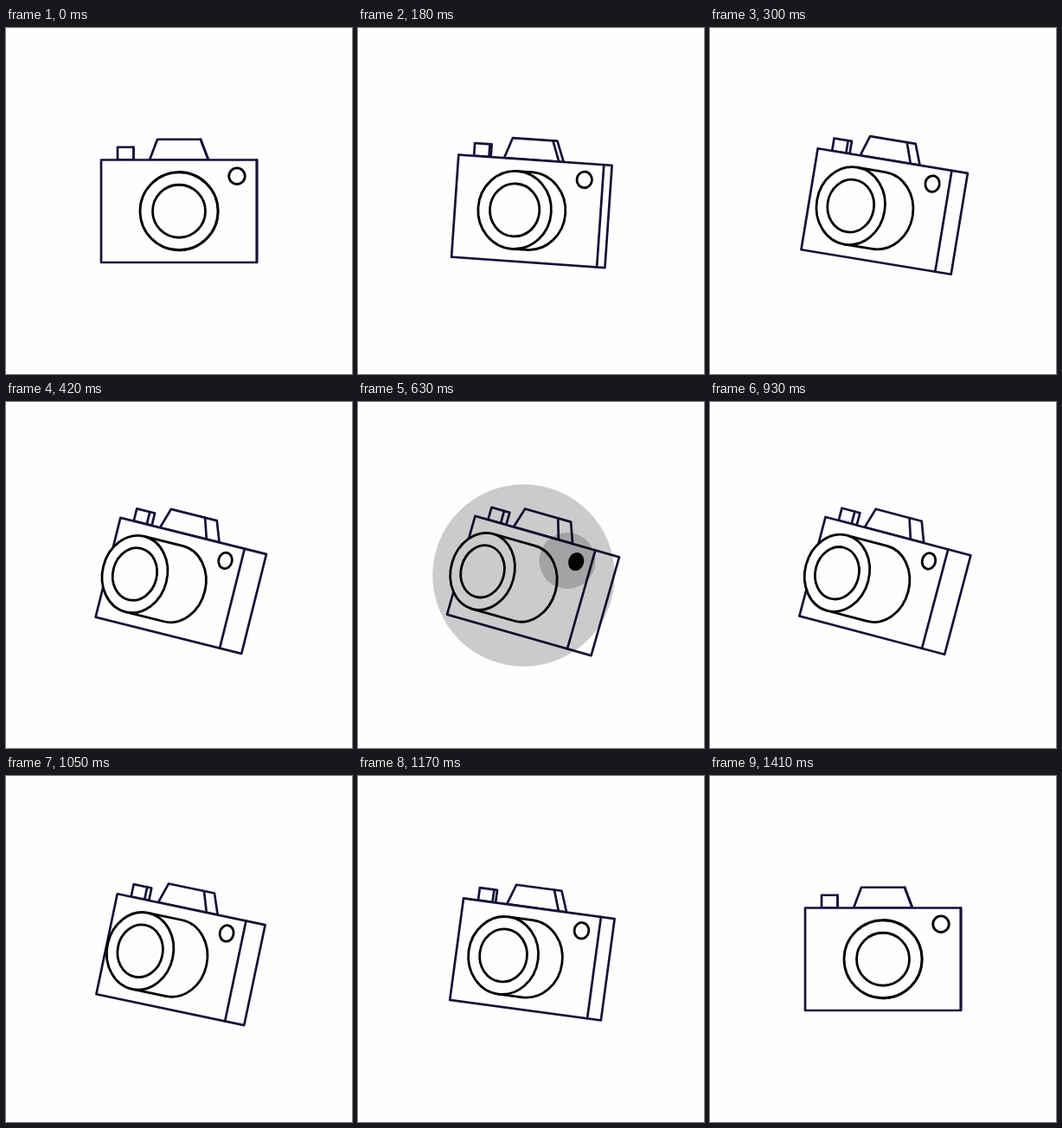
Recreate the animation shown at these times as an HTML page with a canvas. Size 400 by 400 pixels, loop 3470 ms.

```html
<!DOCTYPE html>
<html lang="en">
<head>
<meta charset="utf-8">
<title>Camera</title>
<style>
  html, body { margin: 0; width: 100%; height: 100%; overflow: hidden; background: #fefefe; }
  canvas { display: block; width: 400px; height: 400px; }
</style>
</head>
<body>
<canvas id="stage"></canvas>
<script>
const LOOP = 3470, STEP = 30, RISE = 540;
const TILT = 15.9 * Math.PI / 180;
const NAVY = '#14123a', BLACK = '#000', PAPER = '#fefefe';
const FLASH = [570, 690];
const TOP = -59.25, BOTTOM = 59.25;

// time, turn, slope per ms
const FALL = [
  [540, 1, 0],
  [720, 1, 0],
  [930, 0.93, -0.001],
  [1170, 0.4825, -0.0023],
  [1410, 0, 0]
];

const canvas = document.getElementById('stage');
const ctx = canvas.getContext('2d');
const dpr = window.devicePixelRatio || 1;
canvas.width = canvas.height = Math.round(400 * dpr);

const mix = (a, b, k) => a + (b - a) * k;

function turnAt(t) {
  if (t < RISE) return (1 - Math.cos(Math.PI * t / RISE)) / 2;
  for (let i = 1; i < FALL.length; i++) {
    const [t0, a, ma] = FALL[i - 1], [t1, b, mb] = FALL[i];
    if (t > t1) continue;
    const h = t1 - t0, u = (t - t0) / h, v = 1 - u;
    return a * (1 + 2 * u) * v * v + ma * h * u * v * v
         + b * u * u * (3 - 2 * u) - mb * h * u * u * v;
  }
  return 0;
}

function ink(color, width) {
  ctx.strokeStyle = color;
  ctx.lineWidth = width;
}

function poly(points) {
  ctx.beginPath();
  for (const [x, y] of points) ctx.lineTo(x, y);
  ctx.closePath();
  ctx.fill();
  ctx.stroke();
}

function line(x0, y0, x1, y1) {
  ctx.beginPath();
  ctx.moveTo(x0, y0);
  ctx.lineTo(x1, y1);
  ctx.stroke();
}

function oval(x, y, rx, ry) {
  ctx.beginPath();
  ctx.ellipse(x, y, rx, ry, 0, 0, 2 * Math.PI);
  ctx.fill();
  ctx.stroke();
}

function disc(x, y, r) {
  ctx.beginPath();
  ctx.arc(x, y, r, 0, 2 * Math.PI);
  ctx.fill();
}

function drawCamera(turn, lit) {
  const k = Math.pow(Math.max(turn, 0), 0.81);
  const squash = 1 - 0.185 * k;

  ctx.save();
  ctx.translate(200, 211.75);
  ctx.rotate(TILT * turn);
  ctx.fillStyle = PAPER;
  ink(NAVY, 2.7);

  // shutter button
  const bl = mix(-71, -68.5, k), br = mix(-52.5, -46.7, k), be = mix(-52.5, -53.3, k);
  poly([[bl, TOP], [bl, -74], [br, -74], [br, TOP]]);
  line(be, -74, be, TOP);

  // viewfinder
  const vy = -83;
  poly([[mix(-34, -37.8, k), TOP], [mix(-25, -30.8, k), vy],
        [mix(25, 24.3, k), vy], [mix(34, 33.1, k), TOP]]);
  line(mix(25, 8.8, k), vy, mix(34, 16.3, k), TOP);

  // body and its side
  const left = mix(-90, -84, k), right = mix(90, 89.2, k), edge = mix(90, 60.5, k);
  poly([[left, TOP], [right, TOP], [right, BOTTOM], [left, BOTTOM]]);
  line(edge, TOP, edge, BOTTOM);

  // lens barrel
  ink(BLACK, 2.8);
  const front = -58.2 * k, back = -7.5 * k, r = 45;
  ctx.beginPath();
  ctx.moveTo(front, -r);
  ctx.lineTo(back, -r);
  ctx.ellipse(back, 0, r * squash, r, 0, -Math.PI / 2, Math.PI / 2);
  ctx.lineTo(front, r);
  ctx.fill();
  ctx.stroke();
  oval(front, 0, r * squash, r);
  oval(front, 0, 30.5 * squash, 30.5);

  // lamp
  ctx.fillStyle = lit ? BLACK : PAPER;
  oval(mix(67, 42.7, k), -40.5, 9.3 * squash, 9.3);
  ctx.restore();
}

function draw(time) {
  const t = Math.floor(time % LOOP / STEP + 1e-6) * STEP;
  const lit = t >= FLASH[0] && t < FLASH[1];
  ctx.setTransform(canvas.width / 400, 0, 0, canvas.height / 400, 0, 0);
  ctx.lineJoin = ctx.lineCap = 'round';
  ctx.fillStyle = PAPER;
  ctx.fillRect(0, 0, 400, 400);
  drawCamera(turnAt(t), lit);
  if (lit) {
    ctx.fillStyle = 'rgba(0, 0, 0, 0.2)';
    disc(191.5, 200.5, 105.3);
    disc(242, 183.5, 32.5);
  }
}

const start = performance.now();
function tick() {
  draw(performance.now() - start);
  requestAnimationFrame(tick);
}
tick();
</script>
</body>
</html>
```
